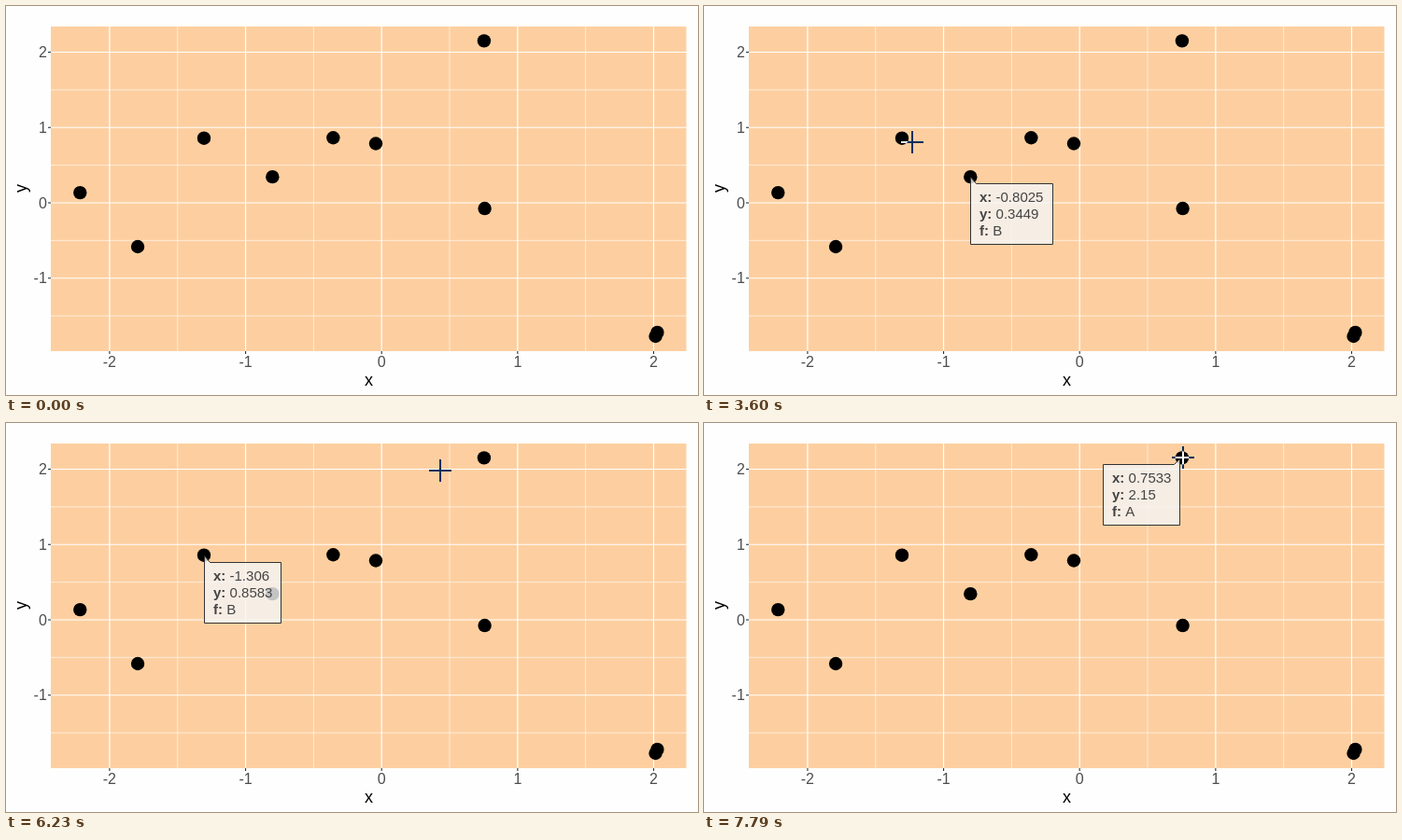
Recreate the animation shown at these times as an HTML page with a canvas. Size 741 by 417 pixels, loop 8000 ms.

```html
<!DOCTYPE html>
<html lang="en">
<head>
<meta charset="utf-8">
<title>Scatter plot tooltips</title>
<style>
  html, body { margin: 0; width: 100%; height: 100%; overflow: hidden; background: #fefefe; }
  canvas { display: block; width: 741px; height: 417px; }
</style>
</head>
<body>
<canvas id="stage" width="741" height="417"></canvas>
<script>
const ctx = document.getElementById('stage').getContext('2d');
const LOOP = 8000;
const FONT = '"Liberation Sans", Arial, sans-serif';
const panel = { left: 48, top: 22, right: 728.5, bottom: 370 };

const px = v => 402.2 + 145.65 * v;
const py = v => 211 - 80.75 * v;

const points = [
  [-2.217, 0.135], [-1.793, -0.582], [-1.306, 0.8583], [-0.8025, 0.3449],
  [-0.356, 0.864], [-0.0426, 0.786], [0.7533, 2.15], [0.758, -0.075],
  [2.027, -1.72], [2.014, -1.771]
];

// Cursor moves: first and last step time, step count, end point, easing per axis
const ease = k => p => k > 0 ? 1 - (1 - p) ** k : p ** -k;
const linear = ease(1);
const moves = [
  { from: 70, to: 70, steps: 1, x: 495, y: 319 },
  { from: 280, to: 390, steps: 3, x: 285, y: 225 },
  { from: 800, to: 1200, steps: 7, x: 288, y: 183, ex: ease(1.5), ey: ease(1.5) },
  { from: 1400, to: 1400, steps: 1, x: 288, y: 184 },
  { from: 3180, to: 3880, steps: 11, x: 213, y: 132, ex: ease(2), ey: ease(1.3) },
  { from: 4010, to: 4200, steps: 3, x: 209, y: 140 },
  { from: 4470, to: 4470, steps: 1, x: 212, y: 140 },
  { from: 5670, to: 5880, steps: 4, x: 434, y: 63, ex: ease(-2.7), ey: ease(-2.7) },
  { from: 6030, to: 6770, steps: 11, x: 512, y: 34, ex: ease(1.6), ey: ease(1.6) },
  { from: 6840, to: 6840, steps: 1, x: 513, y: 34 },
  { from: 7170, to: 7300, steps: 2, x: 513, y: 37 }
];

const tips = [
  { from: 1870, to: 2020, steps: 3, end: 4800, x: 285, y: 190, w: 88, rows: ['-0.8025', '0.3449', 'B'] },
  { from: 4950, to: 5020, steps: 2, end: 7170, x: 212, y: 149, w: 82, rows: ['-1.306', '0.8583', 'B'] },
  { from: 7550, to: 7790, steps: 4, end: LOOP, x: 427, y: 44, w: 82, flip: true, rows: ['0.7533', '2.15', 'A'] }
];

function progress(t, { from, to, steps }) {
  if (t < from) return 0;
  if (t >= to) return 1;
  const gap = (to - from) / (steps - 1);
  return (Math.floor((t - from) / gap + 1e-6) + 1) / steps;
}

function line(x1, y1, x2, y2, color, width) {
  ctx.strokeStyle = color;
  ctx.lineWidth = width;
  ctx.beginPath();
  ctx.moveTo(x1, y1);
  ctx.lineTo(x2, y2);
  ctx.stroke();
}

function text(str, x, y, size, color, align = 'left', weight = '') {
  ctx.font = `${weight} ${size}px ${FONT}`;
  ctx.fillStyle = color;
  ctx.textAlign = align;
  ctx.fillText(str, x, y);
}

function drawGrid(shift, width) {
  const { left, top, right, bottom } = panel;
  for (let v = -2; v <= 2; v++) {
    const x = px(v + shift), y = py(v + shift);
    if (x < right) line(x, top, x, bottom, '#fff', width);
    if (y > top && y < bottom) line(left, y, right, y, '#fff', width);
  }
}

function drawPlot() {
  const { left, top, right, bottom } = panel;
  ctx.fillStyle = '#fefefe';
  ctx.fillRect(0, 0, 741, 417);
  ctx.fillStyle = '#fdcfa0';
  ctx.fillRect(left, top, right - left, bottom - top);
  drawGrid(0.5, 0.6);
  drawGrid(0, 1.2);

  ctx.fillStyle = '#000';
  for (const [x, y] of points) {
    ctx.beginPath();
    ctx.arc(px(x), py(y), 7.2, 0, Math.PI * 2);
    ctx.fill();
  }

  for (let v = -2; v <= 2; v++) {
    const x = px(v), y = py(v);
    line(x, bottom, x, bottom + 3, '#333', 1.1);
    text(v, x, 387, 16, '#4d4d4d', 'center');
    if (v < -1) continue;
    line(left - 3, y, left, y, '#333', 1.1);
    text(v, 43.8, y + 5.6, 16, '#4d4d4d', 'right');
  }

  text('x', 388.6, 407, 18, '#000', 'center');
  ctx.save();
  ctx.translate(22, 195.5);
  ctx.rotate(-Math.PI / 2);
  text('y', 0, 0, 18, '#000', 'center');
  ctx.restore();
}

function drawTip(tip, alpha) {
  const l = tip.x + 0.5, t = tip.y + 0.5, r = l + tip.w, b = t + 65;
  ctx.save();
  ctx.globalAlpha = alpha;
  ctx.beginPath();
  if (tip.flip) {
    ctx.moveTo(l, t);
    ctx.lineTo(r - 6, t);
    ctx.lineTo(r, t - 6);
  } else {
    ctx.moveTo(l, t - 7);
    ctx.lineTo(l + 6, t);
    ctx.lineTo(r, t);
  }
  ctx.lineTo(r, b);
  ctx.lineTo(l, b);
  ctx.closePath();
  ctx.fillStyle = 'rgba(245,245,245,0.8)';
  ctx.fill();
  ctx.strokeStyle = '#333';
  ctx.lineWidth = 1;
  ctx.stroke();

  tip.rows.forEach((value, i) => {
    const label = 'xyf'[i] + ':', x = tip.x + 10, y = tip.y + 20 + 18 * i;
    text(label, x, y, 15, '#444', 'left', 'bold');
    const labelWidth = ctx.measureText(label).width;
    text(value, x + labelWidth + 4.2, y, 15, '#444');
  });
  ctx.restore();
}

function cursorAt(t) {
  let pos = null;
  for (const m of moves) {
    const p = progress(t, m);
    if (!p) break;
    const start = pos || m, { ex = linear, ey = linear } = m;
    pos = {
      x: Math.round(start.x + (m.x - start.x) * ex(p)),
      y: Math.round(start.y + (m.y - start.y) * ey(p))
    };
  }
  return pos;
}

// The crosshair inverts whatever lies beneath it
function drawCursor({ x, y }) {
  ctx.save();
  ctx.globalCompositeOperation = 'difference';
  ctx.fillStyle = '#fff';
  ctx.beginPath();
  ctx.rect(x - 1, y - 12, 2, 24);
  ctx.rect(x - 12, y - 1, 24, 2);
  ctx.fill();
  ctx.restore();
}

function frame() {
  const t = performance.now() % LOOP;
  drawPlot();
  for (const tip of tips) {
    const alpha = t < tip.end ? progress(t, tip) : 0;
    if (alpha) drawTip(tip, alpha);
  }
  const cursor = cursorAt(t);
  if (cursor) drawCursor(cursor);
  requestAnimationFrame(frame);
}
frame();
</script>
</body>
</html>
```
